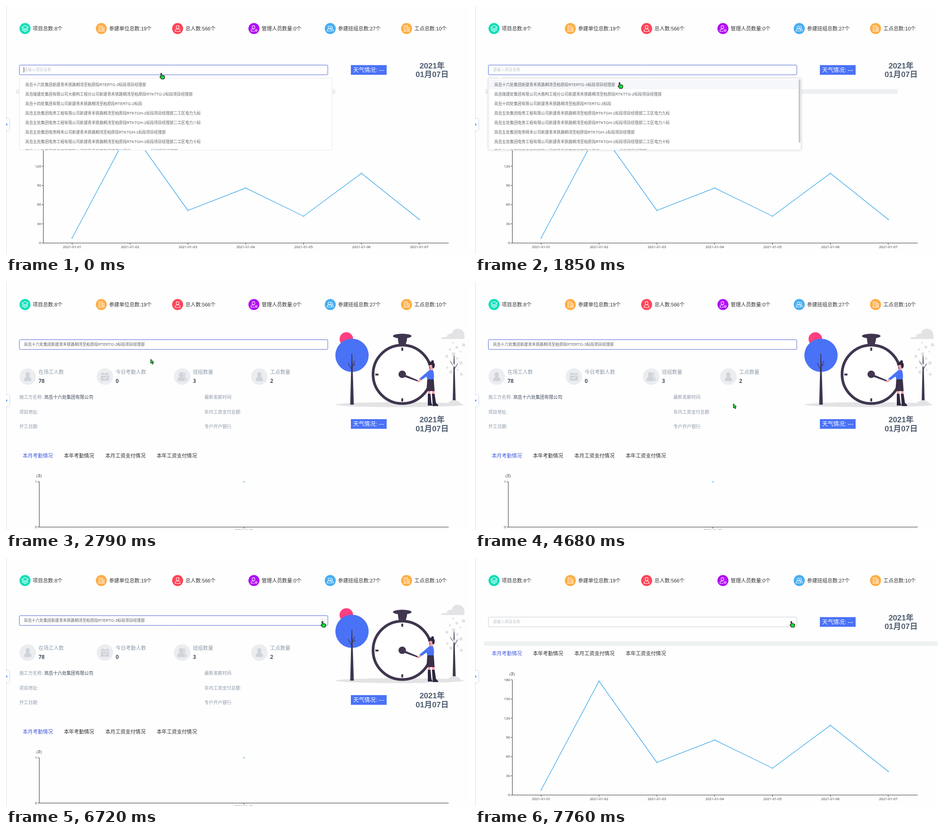
These frames come from a looping animation (1023 by 548 pixels, 8 s). An HTML page with a canvas:

```html
<!DOCTYPE html>
<html lang="zh-CN">
<head>
<meta charset="utf-8">
<style>
html, body { margin: 0; width: 100%; height: 100%; overflow: hidden; background: #fefefe }
canvas { display: block }
</style>
</head>
<body>
<canvas id="stage" width="1023" height="548"></canvas>
<script>
const c = document.getElementById('stage').getContext('2d');
const LOOP = 8000, SELECT = 2020, PICTURE = 2300, SINGLE = 2400, CLEAR = 6910, RELOAD = 7150;
const SANS = "'Liberation Sans','Noto Sans CJK SC','Noto Sans CJK',sans-serif";
const OPEN = "'Open Sans','Noto Sans CJK SC',sans-serif";
const DARK = '#40364f', BLUE = '#4a72f6', MUTED = '#8c99a9';

const ROUTE = '新建青禾铁路桐湾至柏原段', OFFICE = '标段项目经理部';
const FIFTH = '岚岳五处集团电务工程有限公司' + ROUTE + 'RTKTGH-1' + OFFICE + '二工区电力';
const PROJECT = '岚岳十六处集团' + ROUTE + 'RTERTG-3' + OFFICE;
const ITEMS = [
  PROJECT,
  '岚岳隧建处集团有限公司大盾构工程分公司' + ROUTE + 'RTKTTG-2' + OFFICE,
  '岚岳十四处集团有限公司' + ROUTE + 'RTERTG-2标段',
  FIFTH + '九标',
  FIFTH + '八标',
  '岚岳五处集团电务晴禾公司' + ROUTE + 'RTKTGH-1' + OFFICE,
  FIFTH + '十标',
  '岚岳十七处集团电务工程有限公司' + ROUTE + 'RTERGH-4' + OFFICE
];
const TOTALS = [
  ['项目总数:8个', '#0fdfb8', 'layers'], ['参建单位总数:19个', '#ffad45', 'building'],
  ['总人数:566个', '#ff4559', 'person'], ['管理人员数量:0个', '#b10ff4', 'manager'],
  ['参建班组总数:27个', '#48aef2', 'team'], ['工点总数:10个', '#ffad45', 'building']
];
const STATS = [['在场工人数', 78], ['今日考勤人数', 0], ['班组数量', 3], ['工点数量', 2]];
const TABS = [['本月考勤情况', 37], ['本年考勤情况', 128], ['本月工资支付情况', 219.5], ['本年工资支付情况', 333]];
const VALUES = [8, 178, 51, 86, 42, 109, 37];

// pointer tip: time, x, y
const POINTER = [
  [0, 343, 148.5], [120, 343, 148.5], [950, 323, 164], [1730, 319, 169.2], [2020, 319.5, 169],
  [2790, 319.5, 170], [3470, 319, 171], [3720, 319, 171], [4320, 570.5, 268.5], [4680, 570.5, 268.5],
  [5460, 661.5, 183], [5520, 661.5, 183], [6240, 696, 143], [6350, 696, 143], [6720, 699, 140], [LOOP, 699, 140]
];

function text(s, x, y, size, color, { align = 'left', weight = 400, family = SANS } = {}) {
  c.font = `${weight} ${size}px ${family}`;
  c.textAlign = align;
  c.fillStyle = color;
  c.fillText(s, x, y + size * .37);
}
function rect(x, y, w, h, color) {
  c.fillStyle = color;
  c.fillRect(x, y, w, h);
}
function box(x, y, w, h, r, fill, stroke) {
  c.beginPath();
  c.roundRect(x, y, w, h, r);
  paint(fill, stroke);
}
function paint(fill, stroke, width = 1) {
  if (fill) { c.fillStyle = fill; c.fill(); }
  if (stroke) { c.strokeStyle = stroke; c.lineWidth = width; c.stroke(); }
}
function oval(x, y, rx, ry, fill, stroke, width) {
  c.beginPath();
  c.ellipse(x, y, rx, ry, 0, 0, 7);
  paint(fill, stroke, width);
}
const dot = (x, y, r, fill, stroke, width) => oval(x, y, r, r, fill, stroke, width);
function path(d, fill, stroke, width = 1) {
  const p = new Path2D(d);
  if (fill) { c.fillStyle = fill; c.fill(p); }
  if (stroke) { c.strokeStyle = stroke; c.lineWidth = width; c.stroke(p); }
}
function at(x, y, draw) {
  c.save();
  c.translate(x, y);
  draw();
  c.restore();
}
const easeOut = p => 1 - (1 - Math.min(1, Math.max(0, p))) ** 3;

const GLYPHS = {
  layers: 'M0-7L7-3 0 1-7-3ZM-7 0L0 4 7 0M-7 3L0 7 7 3',
  building: 'M-5 6V-6H2V6M2-2H6V6M-7 6H7M-3-3H0M-3 0H0M-3 3H0M4 1V4',
  person: 'M-3-3a3 3.4 0 1 1 6 0a3 3.4 0 1 1-6 0M-5.5 6.5Q-5.5 1-2 1H2Q5.5 1 5.5 6.5Z',
  manager: 'M-4-3a3 3.4 0 1 1 6 0a3 3.4 0 1 1-6 0M2 6H-6.5Q-6.5 1-3 1H1M3 4a2 2 0 1 1 4 0a2 2 0 1 1-4 0',
  team: 'M-4.5-2.5a2.7 3 0 1 1 5.4 0a2.7 3 0 1 1-5.4 0M-7 5.5Q-7 1-3.5 1H0Q3.5 1 3.5 5.5ZM2-5.5Q5-5 4.5-2 4.2 0 3 .5 7 1 7 5H5.5'
};

function totals() {
  TOTALS.forEach(([label, color, icon], i) => {
    const x = 42 + i * 168.6;
    dot(x, 49.8, 12.2, color);
    at(x, 49.8, () => path(GLYPHS[icon], null, '#fff', 1.1));
    text(label, x + 17.3, 50, 11.2, '#303133');
  });
}

function sidebar() {
  rect(0, 0, 1.3, 548, '#e3e5ea');
  c.save();
  c.shadowColor = '#b8c4dc';
  c.shadowBlur = 4;
  box(-6, 249.5, 13, 25, 2, '#fff');
  c.restore();
  path('M0 262L2.5 259V265Z', '#3478f6');
}

function weather(y) {
  rect(762, y - .4, 79, 21.4, BLUE);
  text('天气情况: ---', 801.5, y + 10.5, 12.4, '#fff', { align: 'center' });
  const bold = { align: 'center', weight: 700 };
  text('2021年', 941.5, y + .3, 17.3, '#505d70', bold);
  text('01月07日', 941.5, y + 20, 17.3, '#505d70', bold);
}

function tabs(y) {
  TABS.forEach(([label, x], i) => text(label, x, y, 11.1, i ? '#303133' : '#4158e0'));
}

// y is the height of the top scale line
function chart(y, single, scale) {
  const left = single ? 73.5 : 82.5, height = single ? 100 : 254.5, base = y + height;
  const max = single ? 1 : 180, step = single ? 1 : 30;
  const ink = '#333', small = { family: OPEN };
  text('(次)', left - .3, y - 13, 7.8, ink, { ...small, align: 'center' });
  let axes = `M${left} ${y}V${base}H978`;
  for (let v = 0; v <= max; v += step) {
    const ly = base - v / max * height;
    axes += `M${left} ${ly}h-3.6`;
    text(v, left - 5, ly - .4, 7.8, ink, { ...small, align: 'right' });
  }
  const points = single ? [[525.5, y]]
    : VALUES.map((v, i) => [146.2 + 127.8 * i, y + (1 - v / 180) * height * scale]);
  points.forEach(([x], i) => {
    axes += `M${x} ${base}v3.6`;
    text('2021-01-0' + (single ? 5 : i + 1), x, base + 8.1, 7.8, ink, { ...small, align: 'center' });
  });
  path(axes, null, ink, 1);
  path('M' + points.join('L'), null, '#2b9fe8', 1.2);
  for (const [x, py] of points) dot(x, py, 1.4, '#fff', '#2b9fe8', .8);
}

function input(y, content, color, border) {
  box(29.5, y + .5, 681.5, 21.5, 2, '#fff', border);
  text(content, 39.5, y + 11.3, 8.64, color);
}

function dropdown(t) {
  const hover = t >= 950;
  rect(22, 184, t < 120 ? 706 : 912, 10, '#eeeff1');
  c.save();
  c.shadowColor = t < 120 ? 'transparent' : 'rgba(0,0,0,.13)';
  c.shadowBlur = 5;
  box(29.5, 159.5, 691, 159, 2, '#fff', '#e4e7ed');
  c.restore();
  path('M51 160L55 156 59 160', '#fff', '#f0f2f5', .7);
  c.save();
  c.beginPath();
  c.rect(30, 160, 690, 158);
  c.clip();
  if (hover) rect(30, 163.5, 690, 20.5, '#f5f7fa');
  ITEMS.forEach((item, i) => text(item, 42.5, 174 + 21 * i, 8.64, '#606266'));
  if (hover) box(715, 162, 4, 140, 2, '#c9cbcf');
  c.restore();
}

function details() {
  const person = 'M-4.5-5a4.5 5 0 1 1 9 0Q4.5-1 3 1 8 2 8 7.5Q8 10 5 10H-5Q-8 10-8 7.5-8 2-3 1-4.5-1-4.5-5Z';
  STATS.forEach(([label, value], i) => {
    const x = 48 + 170.6 * i, grey = '#cfd4da';
    dot(x, 209, 18.3, '#ebedf0');
    at(x, 209, () => {
      if (i == 1) {
        box(-9, -7, 18, 16, 1.5, grey);
        path('M-5-9V-5M5-9V-5', null, grey, 2.5);
        path('M-9-3H9M-4 2L-1 5 5 0', null, '#f2f4f6', 1.5);
      } else {
        if (i == 2) at(3.5, 0, () => path(person, '#dadee3'));
        if (i == 2) c.translate(-2.5, 0);
        path(person, grey);
      }
    });
    text(label, x + 23.7, 199, 11.2, MUTED);
    text(value, x + 23.7, 219, 12, '#4a5668', { weight: 700, family: OPEN });
  });
  ['施工方名称:', '项目地址:', '开工日期:'].forEach((s, i) => text(s, 29.5, 254.5 + 32.5 * i, 9.85, MUTED));
  ['最新发薪时间:', '年内工资支付总额:', '专户开户银行:'].forEach((s, i) => text(s, 438.5, 254.5 + 32.5 * i, 9.85, MUTED));
  text('岚岳十六处集团有限公司', 84.5, 254.5, 9.85, '#3a4656', { weight: 500 });
}

function illustration() {
  const grey = '#e3e3e5';
  oval(870, 271, 142, 5.5, grey);
  dot(752, 126, 15, '#ff3f7f');
  dot(764.5, 162, 36.8, BLUE);
  path('M763.5 158H765L768.5 271H760.5Z', DARK);
  path('M764 194L756 179M765 185L771 174M764 188L772 181', null, DARK, 1.3);
  // stopwatch
  path('M866 120H886V127L883 139H868L866 127Z', DARK);
  oval(875.5, 119.5, 20.5, 5.2, DARK);
  dot(875.5, 204, 64.5, '#fff', DARK, 6);
  path('M875.5 145V152M875.5 257V264M816 204.5H823', null, DARK, 4);
  path('M875 202L910 217V220L873 207Z', DARK);
  dot(875.5, 204, 8.3, DARK);
  // snowy tree and cloud
  path('M989.5 157H990.5L993.5 262H987Z', DARK);
  path('M990 187L982 176M990 194L998 180', null, DARK, 1.1);
  path('M961 125Q964 120 974 122 974 114 985 114 988 103 998 103 1013 104 1013 120V126H961Z', grey);
  path('M974 270Q979 262 990 261 1001 262 1006 270Z', grey);
  for (let i = 0; i < 15; i++)
    dot(974 + (i * 23 + 14) % 38, 134 + i * 5, 2 + i * 7 % 4 * .6, grey);
  // woman
  const skin = '#f5a3ad';
  path('M932 241H938L937 249H932ZM941 241H947L947 249H942Z', skin);
  path('M932 247H938L940 268 943 273H932ZM941 247H947L950 267 955 272V274H943Z', '#2f2740');
  path('M931 213H945L947 241H929Z', '#3a3048');
  path('M934 196Q938 191 943 194 947 204 945 215H931L929 209 916 218 913 214Z', BLUE);
  path('M916 214L908 220 912 222 918 217Z', skin);
  path('M937 188H943V195H937Z', skin);
  dot(939.5, 185, 4.5, skin);
  path('M933 184Q932 175 941 176 949 178 947 187 945 194 942 189L941 183Z', '#2f2740');
  dot(942.5, 176, 3, '#2f2740');
}

function pointer(t) {
  const i = POINTER.findIndex(k => k[0] > t), a = POINTER[i - 1], b = POINTER[i];
  const p = (t - a[0]) / (b[0] - a[0]), e = p * p * (3 - 2 * p);
  const hand = t < SELECT || t >= 6150;
  at(a[1] + (b[1] - a[1]) * e, a[2] + (b[2] - a[2]) * e, () => {
    if (hand) path('M-1 .5Q0-.5 1.2.6V4.5L6.5 5.8Q8 6.5 7.5 9L6 13H.5L-3 8.5Q-2.5 6.5-1 7.5Z', '#10e030', '#101810', 1.2);
    else path('M.3.5V10L2.6 8 4.3 11.6 5.9 10.9 4.4 7.3H7.2Z', '#10e030', '#101810', 1);
  });
}

function draw(t) {
  rect(0, 0, 1023, 548, '#fefefe');
  totals();
  const selected = t >= SELECT && t < CLEAR;
  const single = t >= SINGLE && t < RELOAD;
  if (selected) {
    weather(303.4);
    input(127, PROJECT, '#606266', '#4c66d8');
    if (t >= 6240) {
      dot(700.5, 138.5, 4, '#fff', '#c0c4cc', .8);
      path('M699 137l3 3m0-3l-3 3', null, '#c0c4cc', .8);
    }
    details();
    tabs(383.5);
    chart(441.5, single, 1 - .608 * easeOut((t - 2035) / 300));
    if (t >= PICTURE) illustration();
  } else {
    const open = t < SELECT;
    weather(131);
    if (!open) rect(20, 184, 1002, 10, '#eff2f2');
    tabs(211);
    chart(269.3, single, open ? 1 : .392 + .608 * easeOut((t - RELOAD) / 300));
    input(130, '请输入项目名称', '#c0c4cc', open ? '#4c66d8' : '#c8ccd3');
    if (open) {
      dropdown(t);
      if (t < 790 || t >= 1320 && t < 1850) rect(39, 135, 1, 12, '#404040');
    }
  }
  sidebar();
  pointer(t);
}

const start = performance.now();
function frame() {
  draw((performance.now() - start) % LOOP);
  requestAnimationFrame(frame);
}
frame();
</script>
</body>
</html>
```
